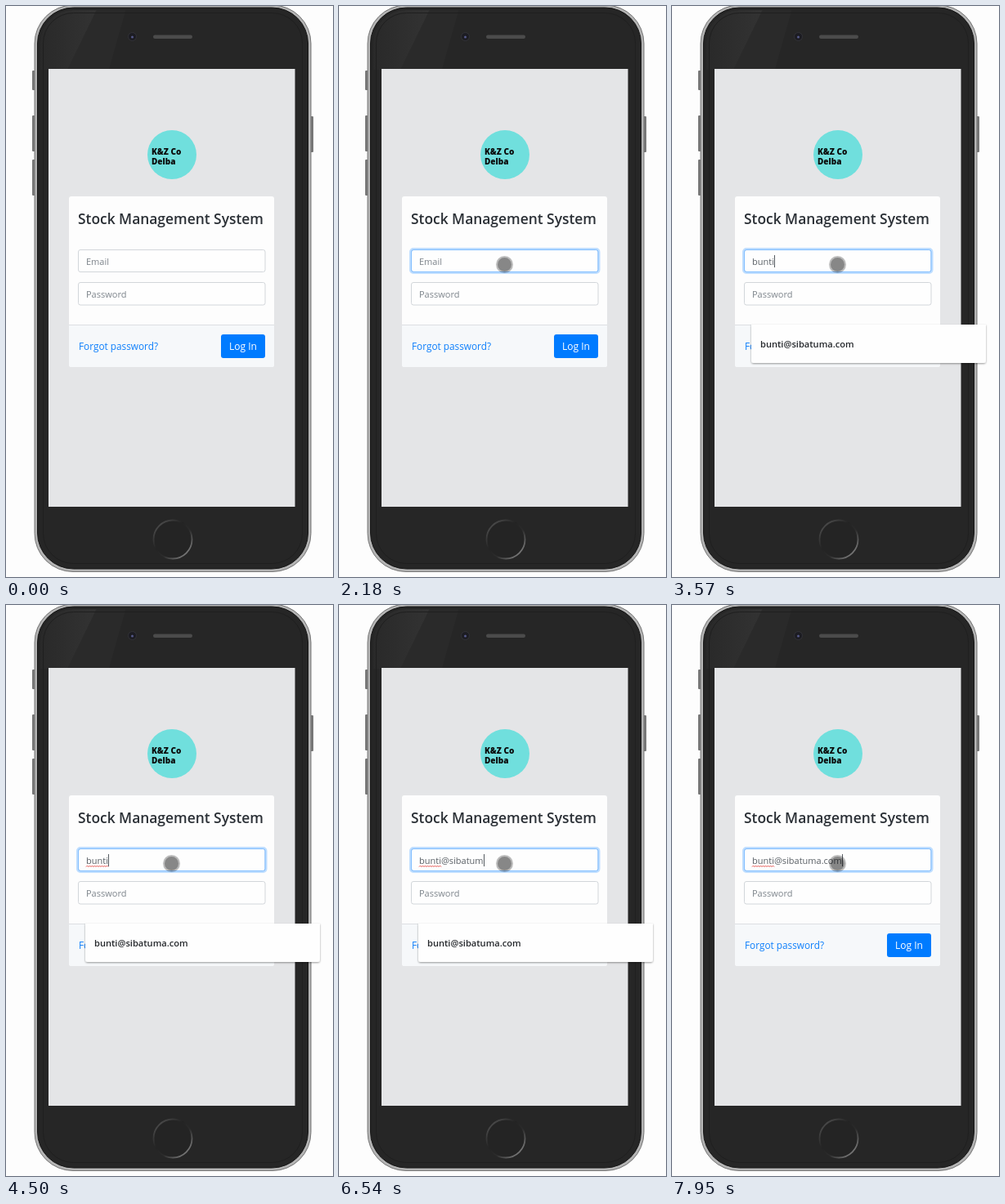
Recreate the animation shown at these times as an HTML page. Size 400 px wide and 699 px high, loop 8000 ms.

```html
<!DOCTYPE html>
<html lang="en">
<head>
<meta charset="utf-8">
<title>Login</title>
<style>
  html, body { margin: 0; width: 100%; height: 100%; overflow: hidden; background: #fdfdfd; }
  svg { display: block; width: 100vw; height: 100vh; }
  text { font-family: "Open Sans", "Noto Sans", sans-serif; }
  .field { fill: #fefefe; stroke: #d2d6da; }
  .hint { font-size: 11px; fill: #7d848b; }
  .typed { font-size: 11px; fill: #5a6066; }
  .logo { font-size: 10px; font-weight: 800; fill: #0b0b0b; }
</style>
</head>
<body>
<svg viewBox="0 0 400 699">
  <defs>
    <linearGradient id="home" x1="0" y1="0" x2="1" y2="1">
      <stop offset=".08" stop-color="#505050"/>
      <stop offset=".4" stop-color="#232323"/>
      <stop offset=".6" stop-color="#2c2c2c"/>
      <stop offset=".9" stop-color="#808080"/>
    </linearGradient>
    <linearGradient id="shine" x1="0" x2="1">
      <stop offset="0" stop-color="#292929"/>
      <stop offset="1" stop-color="#333"/>
    </linearGradient>
    <clipPath id="face"><rect x="42" y="5" width="324" height="681" rx="40"/></clipPath>
    <filter id="shadow" x="-5%" y="-15%" width="110%" height="140%">
      <feDropShadow dx="0" dy="1" stdDeviation="1.3" flood-color="#000" flood-opacity=".4"/>
    </filter>
  </defs>

  <!-- phone -->
  <g fill="#777">
    <rect x="32" y="79" width="4" height="24" rx="1"/>
    <rect x="32" y="134" width="4" height="44" rx="1"/>
    <rect x="32" y="188" width="4" height="44" rx="1"/>
    <rect x="372" y="135" width="4" height="44" rx="1"/>
  </g>
  <rect x="35" y="-1" width="338" height="693.5" rx="47" fill="#b4b4b4" stroke="#777"/>
  <rect x="38.5" y="2" width="331" height="687" rx="44" fill="#262626" stroke="#151515"/>
  <g clip-path="url(#face)">
    <path d="M108 0H148L126 78H73Z" fill="#2a2a2a"/>
    <path d="M40 0H113L75 78H40Z" fill="url(#shine)"/>
  </g>
  <rect x="45.5" y="8.5" width="317" height="674" rx="37" fill="none" stroke="#1f1f1f"/>
  <circle cx="154.500" cy="37.500" r="5" fill="#1c1c22" stroke="#333338"/>
  <circle cx="154.500" cy="38" r="1.500" fill="#55598a"/>
  <rect x="180" y="35.500" width="48" height="4.500" rx="2.200" fill="#4b4b4b"/>
  <circle cx="204" cy="653" r="23.500" fill="#242424" stroke="url(#home)" stroke-width="1.800"/>
  <rect x="52" y="77" width="301.500" height="536" fill="#e4e5e7"/>

  <!-- brand -->
  <circle cx="203" cy="182" r="30" fill="#70dfdd"/>
  <text class="logo" x="178" y="182">K&amp;Z Co</text>
  <text class="logo" x="178" y="194">Delba</text>

  <!-- card -->
  <rect x="77" y="233" width="251" height="209" rx="3" fill="#fdfdfd"/>
  <path d="M77 390H328V439a3 3 0 0 1-3 3H80a3 3 0 0 1-3-3Z" fill="#f6f8fa"/>
  <path d="M77 390.5H328" stroke="#dcdfe2"/>
  <text x="88" y="267" font-size="17.4" font-weight="600" fill="#2b3036">Stock Management System</text>

  <rect class="field" x="88.500" y="298.500" width="228.500" height="27" rx="2.500"/>
  <g id="ring" fill="none">
    <rect x="87.500" y="297.500" width="230.500" height="29" rx="3.500" stroke="#bfdeff" stroke-width="3"/>
    <rect x="88.500" y="298.500" width="228.500" height="27" rx="2.500" stroke="#80bdff"/>
  </g>
  <text id="emailHint" class="hint" x="98" y="317">Email</text>
  <text id="typed" class="typed" x="98" y="317"></text>
  <path id="squiggle" fill="none" stroke="#e0403c" stroke-width=".9"/>
  <rect id="caret" y="305" width="1" height="15" fill="#555b61"/>

  <rect class="field" x="88.500" y="338.500" width="228.500" height="27.500" rx="2.500"/>
  <text class="hint" x="98" y="357">Password</text>

  <text x="89" y="421" font-size="11.8" fill="#0e7ffb">Forgot password?</text>
  <rect x="263" y="402" width="54" height="29" rx="3" fill="#007bff"/>
  <text x="273" y="421" font-size="12" fill="#fff">Log In</text>

  <g id="popup">
    <path d="M97 390H384V434a3 3 0 0 1-3 3H100a3 3 0 0 1-3-3Z" fill="#fefefe" filter="url(#shadow)"/>
    <text id="suggestion" x="108" y="418" font-size="11.1" font-weight="600" fill="#25282c"></text>
  </g>

  <!-- pointers -->
  <circle id="halo" cx="-1" cy="-1" r="11" fill="#fdfd7c"/>
  <g id="touch">
    <circle cx="202.500" cy="316.500" r="10.500" fill="#000" fill-opacity=".26"/>
    <circle cx="202.500" cy="316.500" r="8.500" fill="#000" fill-opacity=".28"/>
  </g>
  <path id="arrow" d="M357.500 638.500v14.500l3.400-3.200 2.300 5 2.200-1-2.300-4.900h4.700z" fill="#fff" stroke="#000" stroke-width=".8"/>
</svg>
<script>
const LOOP = 8000;
const EMAIL = "bunti@sibatuma.com";

// [start ms, characters typed, caret visible]
const TYPING = [
  [0, 0, 0], [1540, 0, 1], [2180, 0, 0],
  [2640, 1, 1], [2780, 2, 1], [3100, 3, 1], [3250, 4, 1], [3570, 5, 1],
  [4040, 5, 0], [4500, 5, 1], [4980, 5, 0], [5280, 6, 1],
  [5600, 7, 1], [5750, 8, 1], [5910, 9, 1], [6070, 10, 1], [6230, 11, 1],
  [6390, 12, 1], [6540, 13, 1], [6710, 14, 1], [7170, 14, 0],
  [7320, 15, 1], [7630, 16, 1], [7780, 17, 1], [7950, 18, 1]
];

// id: [from ms, to ms]
const VISIBLE = {
  arrow: [610, 760],
  halo: [1540, 1710],
  touch: [1710, LOOP],
  popup: [2780, 7950],
  squiggle: [4500, LOOP]
};

const el = id => document.getElementById(id);
const show = (id, on) => el(id).setAttribute("visibility", on ? "visible" : "hidden");

el("suggestion").textContent = EMAIL;
el("squiggle").setAttribute("d", "M98 320.5" + "l1.5-1.5l1.5 1.5".repeat(9));

function render(t) {
  const [, count, caretOn] = TYPING.filter(step => step[0] <= t).pop();
  const typed = el("typed");
  typed.textContent = EMAIL.slice(0, count);
  const width = count ? typed.getComputedTextLength() : 0;
  el("caret").setAttribute("x", Math.round(98 + width));
  show("caret", caretOn);
  show("emailHint", !count);
  el("ring").setAttribute("opacity", t < 1710 ? 0 : t < 1860 ? 0.5 : 1);
  for (const id in VISIBLE) {
    const [from, to] = VISIBLE[id];
    show(id, t >= from && t < to);
  }
}

function tick() {
  render(performance.now() % LOOP);
  requestAnimationFrame(tick);
}
tick();
</script>
</body>
</html>
```
